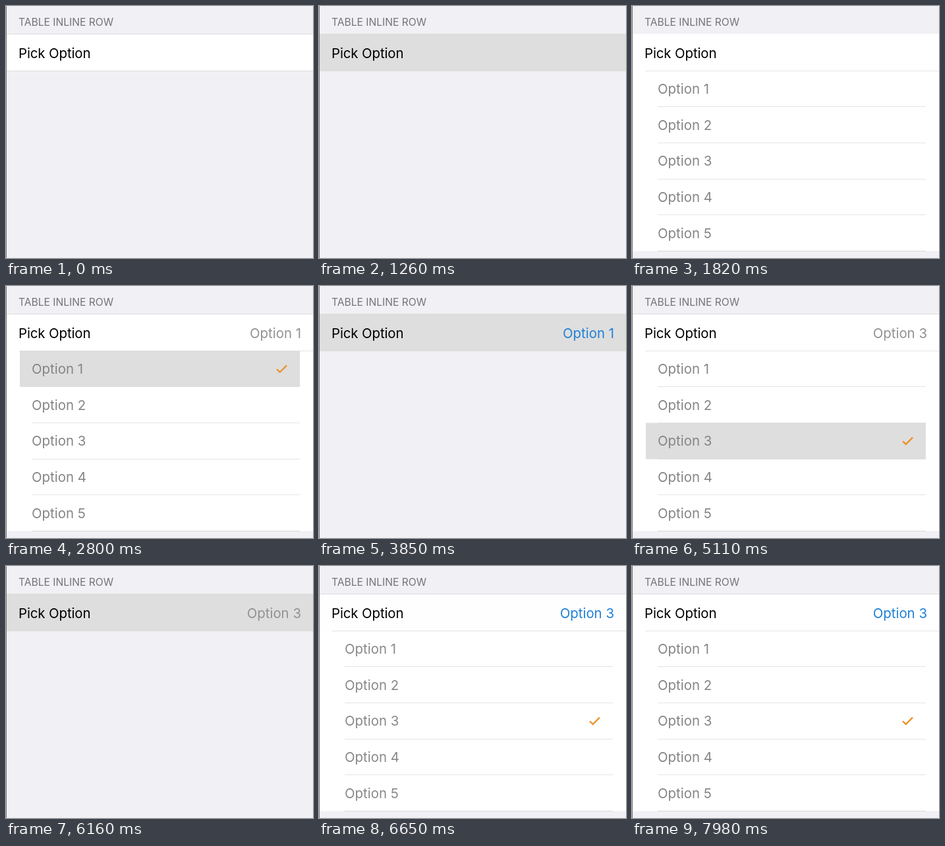
Write an HTML page that moves like this. It is 466 px wide and 382 px high and loops after 8 s.

```html
<!DOCTYPE html>
<html lang="en">
<head>
<meta charset="utf-8">
<title>Table inline row</title>
<style>
  html, body { margin: 0; width: 100%; height: 100%; overflow: hidden; background: #f0f0f5; }
  svg { display: block; width: 100%; height: 100%; font: 20.4px Inter, Roboto, sans-serif; }

  .header { font-size: 15.6px; fill: #747478; }
  .title { letter-spacing: -.1px; }
  .option { fill: #858585; }
  .value { text-anchor: end; }
  .pressed { fill: #dedede; }
  .line { fill: #dedee1; }
  .rule { fill: #e4e4e7; }
  .check { fill: none; stroke: #ec9026; stroke-width: 2.3; }

  /* One 8 s clock for every part; hard changes use step-end. */
  .panel { animation: panel 8s ease-in-out infinite; }
  .row-press { animation: row-press 8s ease-in-out infinite; }
  .top-line { animation: top-line 8s step-end infinite; }
  .value { animation: tint 8s step-end infinite; }
  .first { animation: first 8s step-end infinite; }
  .third { animation: third 8s step-end infinite; }
  .first-press { animation: first-press 8s step-end infinite; }
  .third-press { animation: third-press 8s step-end infinite; }

  @keyframes panel {
    0%, 17%, 39.375%, 48.5%, 68.25%, 78.25% { opacity: 0; }
    22.6%, 35.375%, 54.1%, 64.25%, 83.85%, 100% { opacity: 1; }
  }
  @keyframes row-press {
    0%, 15.69%, 22.6%, 46.31%, 54.1%, 76.06%, 83.85%, 100% { opacity: 0; }
    15.7%, 17%, 46.32%, 48.5%, 76.07%, 78.25% { opacity: 1; }
  }
  @keyframes top-line {
    0%, 34.95% { opacity: 1; }
    15.7% { opacity: 0; }
  }
  @keyframes tint {
    0%, 63.82% { fill: #929295; }
    48.07%, 77.82%, 100% { fill: #2081d8; }
  }
  @keyframes first {
    0%, 63.82%, 100% { opacity: 0; }
    34.95% { opacity: 1; }
  }
  @keyframes third {
    0% { opacity: 0; }
    63.82%, 100% { opacity: 1; }
  }
  @keyframes first-press {
    0%, 40%, 100% { opacity: 0; }
    34.95% { opacity: 1; }
  }
  @keyframes third-press {
    0%, 69%, 100% { opacity: 0; }
    63.82% { opacity: 1; }
  }
</style>
</head>
<body>
<svg viewBox="0 0 466 382" preserveAspectRatio="none">
  <rect width="466" height="382" fill="#f0f0f5"/>
  <text class="header" x="19" y="30">TABLE INLINE ROW</text>

  <rect y="42" width="466" height="56" fill="#fff"/>
  <rect class="line top-line" y="42" width="466" height="1"/>
  <rect class="line" y="98" width="466" height="1"/>

  <g class="panel">
    <rect y="98" width="466" height="273.5" fill="#fff"/>
    <rect class="rule" x="20" y="98" width="446" height="1"/>
    <g class="rule">
      <rect x="39" y="152" width="407" height="1"/>
      <rect x="39" y="207" width="407" height="1"/>
      <rect x="39" y="262" width="407" height="1"/>
      <rect x="39" y="316" width="407" height="1"/>
      <rect x="39" y="371" width="407" height="1" fill="#d8d8db"/>
    </g>
    <rect class="pressed first-press" x="21" y="98" width="425" height="55"/>
    <rect class="pressed third-press" x="21" y="207.5" width="425" height="55"/>
    <g class="option">
      <text x="39" y="133.2">Option 1</text>
      <text x="39" y="187.8">Option 2</text>
      <text x="39" y="242.4">Option 3</text>
      <text x="39" y="297.1">Option 4</text>
      <text x="39" y="351.7">Option 5</text>
    </g>
    <g class="check">
      <path class="first" d="M411 126l4.7 4.7L426 120.4"/>
      <path class="third" d="M411 235.2l4.7 4.7L426 229.6"/>
    </g>
  </g>

  <rect class="pressed row-press" y="42" width="466" height="56.5"/>
  <text class="title" x="19" y="79.2">Pick Option</text>
  <g class="first"><text class="value" x="448" y="79.2">Option 1</text></g>
  <g class="third"><text class="value" x="448" y="79.2">Option 3</text></g>
  <rect width="1" height="382" fill="#77777a"/>
</svg>
</body>
</html>
```
